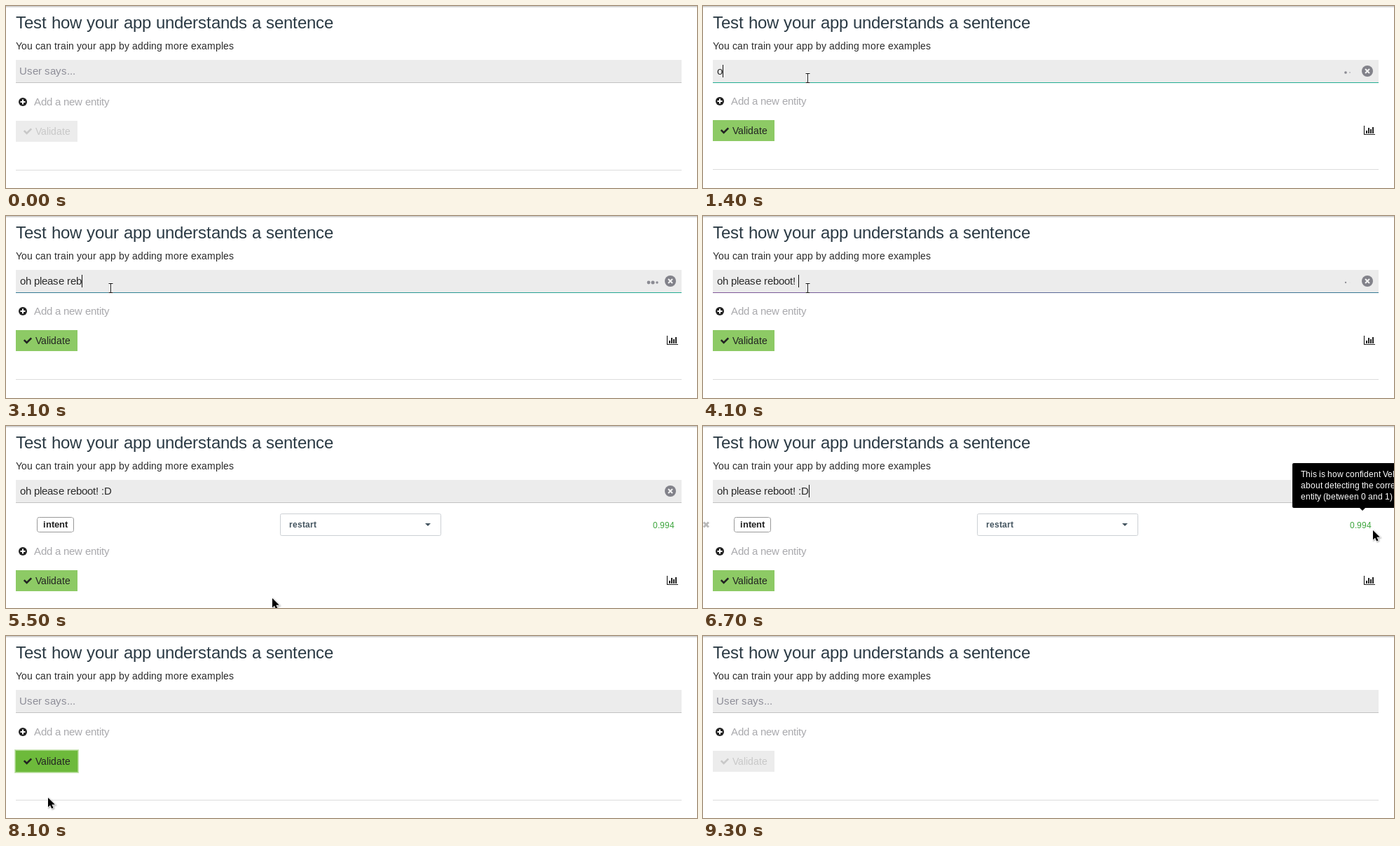
An HTML page with a canvas that plays this animation: 986x260 px, repeating every 9.6 s.

```html
<!DOCTYPE html>
<html lang="en">
<head>
<meta charset="utf-8">
<title>Sentence test</title>
<style>
html, body { margin: 0; width: 100%; height: 100%; overflow: hidden; background: #fff; }
canvas { display: block; }
</style>
</head>
<body>
<canvas id="stage" width="986" height="260"></canvas>
<script>
const ctx = document.getElementById('stage').getContext('2d');
const LOOP = 9600, STEP = 100;
const SENTENCE = 'oh please reboot! :D';
const DARK = '#222';

// Pointer positions: [time, x, y]
const BEAM = [[400, 143, 84], [500, 143, 84], [700, 149, 103], [5200, 149, 103]];
const ARROW = [
  [5300, 255, 129], [5500, 380, 246], [5600, 400, 213], [6000, 400, 213],
  [6700, 956, 149], [6800, 955, 148], [7100, 955, 148], [7900, 60, 231],
  [8300, 60, 231], [8600, 108, 220], [8700, 108, 220], [9200, 2, 36]
];

const clamp = (v, lo = 0, hi = 1) => Math.min(hi, Math.max(lo, v));
const smooth = p => p * p * (3 - 2 * p);
const mix = (a, b, p) => a + (b - a) * p;
const within = (t, a, b) => t >= a && t < b;
const widthOf = str => ctx.measureText(str).width;

function along(keys, t) {
  if (t < keys[0][0] || t > keys[keys.length - 1][0]) return null;
  const i = Math.max(1, keys.findIndex(k => k[0] >= t));
  const [t0, x0, y0] = keys[i - 1], [t1, x1, y1] = keys[i];
  const p = smooth((t - t0) / (t1 - t0));
  return [Math.round(mix(x0, x1, p)), Math.round(mix(y0, y1, p))];
}

function rect(x, y, w, h, color) {
  ctx.fillStyle = color;
  ctx.fillRect(x, y, w, h);
}

// Sets glyphs on whole pixels, with rounded advances and kerning; returns the end x
function text(str, x, y, size, color, weight = 'normal') {
  ctx.font = `${weight} ${size}px "Liberation Sans", Arial, sans-serif`;
  ctx.fillStyle = color;
  let prev = '';
  for (const ch of str) {
    if (prev) x += Math.round(widthOf(prev + ch) - widthOf(prev) - widthOf(ch));
    ctx.fillText(ch, x, y);
    x += Math.round(widthOf(ch));
    prev = ch;
  }
  return x;
}

function disc(x, y, r, color) {
  ctx.fillStyle = color;
  ctx.beginPath();
  ctx.arc(x, y, r, 0, 7);
  ctx.fill();
}

function stroke(d, color, width) {
  ctx.strokeStyle = color;
  ctx.lineWidth = width;
  ctx.stroke(new Path2D(d));
}

function fill(d, color) {
  ctx.fillStyle = color;
  ctx.fill(new Path2D(d));
}

function roundRect(x, y, w, h, r) {
  ctx.beginPath();
  ctx.roundRect(x, y, w, h, r);
}

function header() {
  rect(0, 0, 986, 260, '#fff');
  rect(0, 0, 986, 1, '#ccc');
  rect(0, 1, 986, 1, '#e4e4e4');
  rect(0, 2, 986, 1, '#f7f7f7');
  text('Test how your app understands a sentence', 14, 32, 24, '#2b3a44');
  text('You can train your app by adding more examples', 14, 62, 14, '#2a2a2a');
}

function typedCount(t) {
  if (t < 2100) return clamp((t - 1300) / 100, 0, 8);
  if (t < 4400) return Math.min(18, 8 + Math.floor((t - 2100) / 190));
  return t < 4600 ? 19 : 20;
}

function underline(t) {
  const v = (t - 2100) / 1000;
  const hues = [[34, 172, 146], [52, 120, 148], [128, 86, 152]];
  const g = ctx.createLinearGradient(14, 0, 964, 0);
  for (let i = 0; i <= 4; i++) {
    const s = clamp(v - i / 4, 0, 2), k = Math.min(1, Math.floor(s));
    g.addColorStop(i / 4, `rgb(${hues[k].map((c, j) => mix(c, hues[k + 1][j], s - k))})`);
  }
  return g;
}

function dots(t) {
  for (let i = 0; i < 3; i++) {
    const p = (t - 2100 + 1060 - 160 * i + 1400) % 1400;
    const s = smooth(clamp(1 - Math.abs(p - 560) / 560));
    disc(917 + 6 * i, 95, 2.6 * s, '#8b8b93');
  }
}

function input(t, active, loading) {
  rect(14, 77, 950, 32, '#ececec');
  rect(14, 109, 950, 1, loading ? underline(t) : '#c2c2c2');
  let caretX = 20;
  if (active) caretX = text(SENTENCE.slice(0, typedCount(t)), 20, 98, 15, '#2a2a2a');
  else text('User says...', 19, 98, 15, '#8e8e98');

  const blink = t < 4600 || Math.floor((t - 4550) / 515) % 2 === 0;
  if (within(t, 700, 7700) && blink) rect(caretX, 84, 1, 18, '#111');
  if (loading) dots(t);
  if (active) {
    disc(948, 93, 8, '#82828a');
    stroke('M945 90l6 6m0-6l-6 6', '#f4f4f4', 2);
  }
}

function entityRow(hover) {
  if (hover) stroke('M1 137.5l7 7m0-7l-7 7', '#b9b9b9', 3);
  ctx.setLineDash([1, 1]);
  ctx.lineDashOffset = 0.5;
  ctx.strokeStyle = '#333';
  ctx.lineWidth = 1;
  roundRect(44.5, 130.5, 52, 21, 3);
  ctx.stroke();
  ctx.setLineDash([]);
  text('intent', 53, 145, 13, DARK, 'bold');

  ctx.strokeStyle = '#ccd0d4';
  roundRect(391.5, 125.5, 229, 31, 2);
  ctx.stroke();
  text('restart', 404, 145, 12, '#43545f', 'bold');
  fill('M598 139h8l-4 4z', '#43545f');
  text('0.994', 923, 146, 12, '#3da53d');
}

function button(t, y, enabled, over) {
  const focused = within(t, 8100, 8200);
  if (focused) {
    rect(12, y - 2, 92, 34, '#cbe6b8');
    rect(13, y - 1, 90, 32, '#a5d583');
  }
  const lit = enabled || focused;
  rect(14, y, 88, 30, !lit ? '#ececec' : focused || over ? '#6dba3b' : '#8dca65');
  // The label loses its colour a little after the button does
  const fade = t >= 8200 ? clamp((t - 8300) / 300) : 1;
  const grey = Math.round(mix(34, 200, fade));
  const ink = lit ? DARK : `rgb(${grey},${grey},${grey})`;
  stroke(`M25.8 ${y + 14.2}l3.8 3.8l6.6-6.6`, ink, 2.6);
  text('Validate', 42, y + 20, 14, ink);
}

function chart(y) {
  stroke(`M943.5 ${y + 8}v12.5h15.5`, DARK, 1.2);
  [4, 8, 6, 9].forEach((h, i) => rect(946 + 3 * i, y + 19 - h, 2, h, DARK));
}

function tooltip() {
  ctx.fillStyle = '#000';
  roundRect(841, 53, 160, 64, 2);
  ctx.fill();
  fill('M937 117h8l-4 4z', '#000');
  ['This is how confident Vela is', 'about detecting the correct', 'entity (between 0 and 1)']
    .forEach((line, i) => text(line, 853, 73 + 16 * i, 12, '#fff'));
}

function arrow([x, y]) {
  ctx.save();
  ctx.translate(x, y);
  const shape = 'M0 0v13.5l3-2.7l2.2 4.7l2.4-1.1l-2.2-4.6h4.4z';
  ctx.shadowColor = 'rgba(0,0,0,.4)';
  ctx.shadowBlur = 2;
  ctx.shadowOffsetX = ctx.shadowOffsetY = 1;
  stroke(shape, '#fff', 1.4);
  ctx.shadowColor = 'transparent';
  fill(shape, '#000');
  ctx.restore();
}

function beam([x, y]) {
  ctx.save();
  ctx.translate(x + 0.5, y);
  const shape = 'M-3-6.5h6m-3 0v13m-3 0h6';
  stroke(shape, '#fff', 3);
  stroke(shape, '#111', 1);
  ctx.restore();
}

function draw(t) {
  const active = within(t, 1400, 8100);
  const loading = within(t, 1400, 5400);
  const result = within(t, 5400, 8100);
  const pos = within(t, 300, 400) ? [138, 75] : along(ARROW, t);
  const y = result ? 206 : active ? 163 : 164;

  header();
  input(t, active, loading);
  if (result) entityRow(pos && within(pos[1], 120, 163));

  disc(24, y - 27, 6, DARK);
  stroke(`M20.5 ${y - 27}h7m-3.5-3.5v7`, '#fff', 2);
  text('Add a new entity', 40, y - 22, 15, '#a9a9ad');

  const over = pos && within(pos[0], 14, 102) && within(pos[1], y, y + 30);
  button(t, y, active, over);
  if (active) chart(y);
  rect(14, y + 70, 950, 1, '#dcdcdc');

  if (within(t, 6600, 7300)) tooltip();
  if (pos) arrow(pos);
  const beamPos = along(BEAM, t);
  if (beamPos) beam(beamPos);
}

function tick() {
  const t = performance.now() % LOOP;
  draw(Math.floor(t / STEP) * STEP);
  requestAnimationFrame(tick);
}
tick();
</script>
</body>
</html>
```
